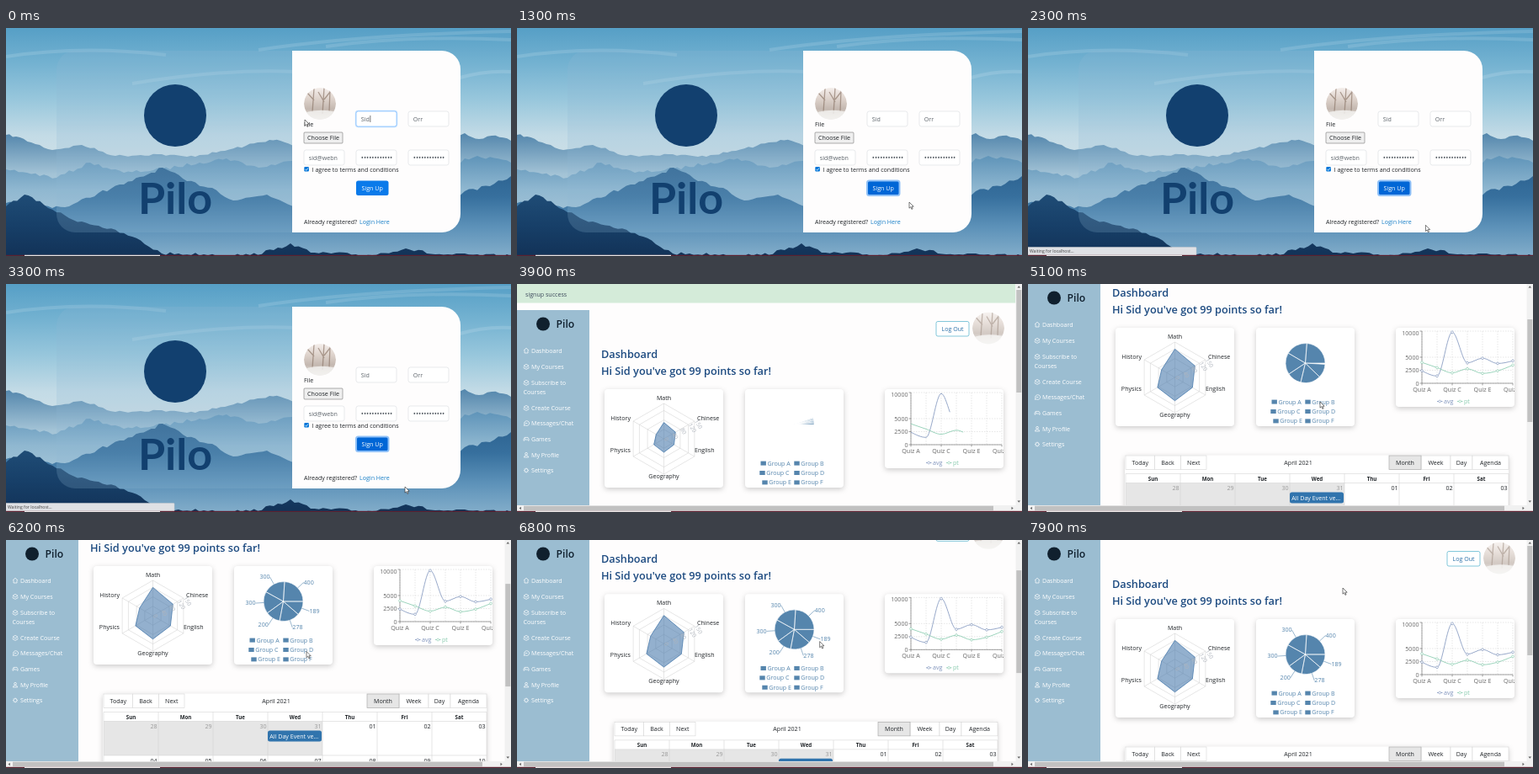
An HTML page for the animation above (8000 ms loop, 600 by 271 pixels).

```html
<!DOCTYPE html>
<html lang="en">
<head>
<meta charset="utf-8">
<title>Sign up and dashboard</title>
<style>
html, body { margin: 0; width: 100%; height: 100%; overflow: hidden; background: #fefdfd; }
svg { display: block; width: 600px; height: 271px; }
text { font: 7.1px "Open Sans", "Noto Sans", sans-serif; fill: #212529; white-space: pre; }
.m { text-anchor: middle; }
.e { text-anchor: end; }
.card { fill: #fff; filter: drop-shadow(0 2px 3px rgba(0,0,0,.2)); }
.field { fill: #fff; stroke: #d8dce0; stroke-width: .6; }
.val { fill: #5b6269; }
.w { fill: #fff; }
.icon { fill: none; stroke: #fff; stroke-width: .7; stroke-linejoin: round; }
.h { font-size: 12.7px; font-weight: 600; fill: #1c4a80; }
.steel { fill: #5585ad; }
.axis { fill: #666; }
.grid { fill: none; stroke: #ccc; stroke-width: .5; }
.line { fill: none; stroke-width: .8; }
.day { font-size: 6.2px; font-weight: 700; }
</style>
</head>
<body>
<svg id="stage" viewBox="0 0 600 271" xmlns="http://www.w3.org/2000/svg"></svg>
<script>
const LOOP = 8000, OPEN = 3400, DISMISS = 7400, ALERT = 31;
const $ = id => document.getElementById(id);
const text = (x, y, s, cls = '', more = '') => `<text x="${x}" y="${y}" class="${cls}" ${more}>${s}</text>`;
const rect = (x, y, w, h, fill, more = '') => `<rect x="${x}" y="${y}" width="${w}" height="${h}" fill="${fill}" ${more}/>`;
const path = (d, more = '') => `<path d="${d}" ${more}/>`;
const group = (id, s, more = '') => `<g id="${id}" ${more}>${s}</g>`;
const box = (x, y, w, h, cls, r = 2.5) => `<rect x="${x}" y="${y}" width="${w}" height="${h}" rx="${r}" class="${cls}"/>`;
const pt = p => p.map(v => v.toFixed(2)).join(' ');
const polar = (cx, cy, r, deg) => [cx + r * Math.cos(deg * Math.PI / 180), cy - r * Math.sin(deg * Math.PI / 180)];
const gradient = (id, ...stops) => `<linearGradient id="${id}" x2="0" y2="1">${
  stops.map((c, i) => `<stop offset="${i / (stops.length - 1)}" stop-color="${c}"/>`).join('')}</linearGradient>`;

let seed = 7;
const rnd = () => (seed = seed * 16807 % 2147483647) / 2147483647;

// Mountain outline: rough line through a few peaks, closed at the bottom.
function ridge(pts, fill, rough) {
  let d = 'M0 271';
  pts.forEach(([x, y], i) => {
    d += `L${x} ${y}`;
    const next = pts[i + 1];
    if (!next) return;
    const n = Math.ceil((next[0] - x) / 5);
    for (let k = 1; k < n; k++)
      d += 'L' + pt([x + (next[0] - x) * k / n, y + (next[1] - y) * k / n + (rnd() - .5) * rough]);
  });
  return path(d + 'L600 271Z', `fill="url(#${fill})"`);
}

const defs = `<defs>
  ${gradient('sky', '#569fc6', '#74b2d1', '#98c7dc', '#c3dbe6', '#d3e2e8')}
  ${gradient('far', '#5386ac', '#a3c3d6', '#c3d8e3', '#c3d8e3')}
  ${gradient('mid', '#5f94b9', '#8fb7d0', '#a9c8da', '#a9c8da')}
  ${gradient('hill', '#2b608e', '#37709e', '#5c91b8', '#82adca')}
  ${gradient('near', '#1f4c76', '#173f68', '#123257')}
  ${gradient('photo', '#f4eeeb', '#dfd4cd', '#c4b8b0', '#f2efee')}
  <clipPath id="disc"><circle r="19"/></clipPath>
  <clipPath id="view"><rect width="592.5" height="263"/></clipPath>
  <clipPath id="chart"><rect x="437" y="94" width="141" height="94"/></clipPath>
</defs>`;

const avatar = (x, y, o) => `<g transform="translate(${x} ${y})" clip-path="url(#disc)" opacity="${o}">
  <circle r="19" fill="url(#photo)"/>
  ${path('M-9 10L-7-18M3 12L5-19M11 9L12-16M-7-4L-15-13M5-2L-2-14M5-5L12-14', 'fill="none" stroke="#8b7668" stroke-width="1.3" opacity=".65"')}
  ${path('M-20 11Q0 5 20 10V20H-20Z', 'fill="#f3f1ef" opacity=".85"')}</g>`;

function signupPage() {
  const scene = rect(0, 0, 600, 170, 'url(#sky)') +
    path('M300 26Q420 8 600 4M380 22Q480 8 600 14M0 34Q90 20 190 32M150 66Q260 48 345 52M535 60Q570 50 600 52', 'fill="none" stroke="#fff" stroke-width="4" opacity=".13"') +
    ridge([[0,127],[12,129],[30,136],[55,145],[90,139],[130,152],[180,150],[215,153],[250,148],[285,140],[313,133],[326,134],[345,142],[520,130],[545,125],[562,132],[577,128],[600,134]], 'far', 3) +
    ridge([[0,168],[25,172],[60,178],[100,160],[140,172],[185,168],[230,160],[262,155],[300,166],[340,158],[520,165],[560,152],[600,160]], 'mid', 4) +
    ridge([[0,208],[40,212],[75,212],[110,196],[150,182],[186,166],[215,182],[245,190],[270,205],[310,198],[345,212],[500,222],[545,194],[575,188],[600,176]], 'hill', 4) +
    ridge([[0,212],[22,198],[45,210],[75,226],[110,235],[150,248],[185,268],[290,270],[318,264],[338,256],[362,267],[435,270],[475,262],[510,269],[600,271]], 'near', 4);
  const field = (x, y, s, size = 7.1) => box(x, y, 48, 18, 'field') +
    text(x + 5.8, y + 11.6, s, 'val', `style="font-size:${size}px"`);
  const dots = '•'.repeat(12);
  return scene +
    path('M82 27H340V243H82A22 22 0 0 1 60 221V49A22 22 0 0 1 82 27Z', 'fill="#8fb6d2" opacity=".22"') +
    path('M340 27H518A22 22 0 0 1 540 49V221A22 22 0 0 1 518 243H340Z', 'fill="#fefdfd"') +
    '<circle cx="201" cy="104" r="37" fill="#12406f"/>' +
    text(201, 221, 'Pilo', 'm', 'style="font:700 52px Lato,sans-serif;fill:#12406f"') +
    avatar(373, 90, 1) + text(354, 117, 'File') +
    rect(354, 124, 46, 13, '#efefef', 'stroke="#767676" stroke-width=".6" rx="1"') + text(377, 133.3, 'Choose File', 'm') +
    box(416, 99, 48, 18, 'field') +
    group('focus', rect(416, 99, 48, 18, '#fff', 'rx="2.5" stroke="#bfdeff" stroke-width="2.4"') +
      rect(416, 99, 48, 18, '#fff', 'rx="2.5" stroke="#80bdff" stroke-width=".7"')) +
    text(421.8, 110.6, 'Sid', 'val') + rect(432.6, 104, .6, 8, '#222', 'id="caret"') +
    field(478, 99, 'Orr') + field(354, 145, 'sid@webn') + field(416, 145, dots, 8.3) + field(478, 145, dots, 8.3) +
    rect(354.3, 165, 5.6, 5.6, '#0075d8', 'rx="1"') + path('M355.4 167.9l1.3 1.4 2.2-2.9', 'fill="none" stroke="#fff" stroke-width=".8"') +
    text(363.6, 171, 'I agree to terms and conditions') +
    rect(416, 181.5, 38.5, 17.5, '#0a7aea', 'id="submit" rx="2.5" stroke="#8fc0f7" stroke-width="0"') + text(435.2, 193, 'Sign Up', 'm w') +
    text(354, 233, 'Already registered?') + text(420, 233, 'Login Here', '', 'style="fill:#1a80c8"') +
    group('status', rect(-1, 260.5, 201, 10, '#dfe1e5', 'rx="1" stroke="#c4c7cb" stroke-width=".5"') +
      text(2, 267.3, 'Waiting for localhost...', '', 'style="font-size:5.1px;fill:#444"'));
}

const icons = {
  home: 'M8 0L11 -2.8 14 0M9 -.5V3H13V-.5',
  cap: 'M8 -.8L11 -2.6 14 -.8 11 1ZM8 .6V1.8L11 3.4 14 1.8V.6',
  chat: 'M8.3 2.8L8.8 1A3 2.8 0 1 1 10 2.4ZM9.8 0H12.4',
  game: 'M9 -1.6H13Q14.5 0 14 2.4L12.4 1H9.6L8 2.4Q7.5 0 9 -1.6ZM9.6 -.7V.7',
  user: 'M9.6 -1.2A1.4 1.4 0 1 0 12.4 -1.2A1.4 1.4 0 1 0 9.6 -1.2M8.3 3Q8.6 .7 11 .7T13.7 3Z',
  gear: 'M9 0A2 2 0 1 0 13 0A2 2 0 1 0 9 0M11 -3V-2M11 2V3M8 0H9M13 0H14M9 -2L9.6 -1.4M13 2L12.4 1.4M13 -2L12.4 -1.4M9 2L9.6 1.4'
};
function sidebar() {
  const items = [['home', 48, 'Dashboard'], ['cap', 67, 'My Courses'], ['cap', 86, 'Subscribe to'], ['cap', 116, 'Create Course'],
    ['chat', 134.5, 'Messages/Chat'], ['game', 153, 'Games'], ['user', 172, 'My Profile'], ['gear', 190.5, 'Settings']];
  return rect(0, 0, 86, 271, '#9bbdd1') + '<circle cx="31" cy="16.5" r="8" fill="#10202e"/>' +
    text(46.5, 20.5, 'Pilo', '', 'style="font-size:12.2px;font-weight:600;fill:#10202e"') +
    items.map(([icon, y, s]) => path(icons[icon], `class="icon" transform="translate(0 ${y})"`) + text(17, y + 2.5, s, 'w')).join('') +
    text(7.5, 99.5, 'Courses', 'w');
}

// Radar chart
const RX = 174.5, RY = 153, RR = 42;
const marks = [120, 98, 86, 99, 85, 65];
const hexagon = f => 'M' + marks.map((v, i) => pt(polar(RX, RY, f(v), 90 - i * 60))).join('L') + 'Z';
function radar() {
  const rings = [40, 80, 120, 150];
  const labels = [['Math', 174.5, 106.5, 'm'], ['Chinese', 214, 130.5, ''], ['English', 211, 169, ''],
    ['Geography', 174.5, 199.5, 'm'], ['Physics', 135, 169, 'e'], ['History', 135, 130.5, 'e']];
  return box(104, 94, 141, 117, 'card', 4) +
    rings.map(v => path(hexagon(() => v / 150 * RR), 'class="grid"')).join('') +
    marks.map((v, i) => path(`M${RX} ${RY}L${pt(polar(RX, RY, RR, i * 60 + 30))}`, 'class="grid"')).join('') +
    path('', 'id="radar" fill="#4b7cae" fill-opacity=".6" stroke="#4779ab" stroke-width=".8"') +
    [0, ...rings].map(v => {
      const [x, y] = polar(RX, RY, v / 150 * RR, 30);
      return text(x, y, v, '', `transform="rotate(60 ${x} ${y})" style="fill:#aeb4bc;font-size:6.6px"`);
    }).join('') +
    labels.map(([s, x, y, c]) => text(x, y, s, c)).join('');
}

// Pie chart
const PX = 329.5, PY = 136, PR = 23.5;
const shares = [400, 300, 300, 200, 278, 189];
const total = shares.reduce((a, b) => a + b);
const slices = k => {
  let a = 0;
  return shares.map(v => { const s = a; a += v / total * 360 * k; return [s, a]; });
};
const wedge = ([a, b]) => `M${PX} ${PY}L${pt(polar(PX, PY, PR, a))}A${PR} ${PR} 0 0 0 ${pt(polar(PX, PY, PR, b))}Z`;
function pie() {
  const labels = slices(1).map(([a, b], i) => {
    const m = (a + b) / 2, p = polar(PX, PY, PR, m), q = polar(PX, PY, PR + 9.5, m);
    return path(`M${pt(p)}L${pt(q)}`, 'stroke="#5585ad" stroke-width=".6"') +
      text(q[0], q[1] + 2.2, shares[i], q[0] > PX ? 'steel' : 'e steel');
  }).join('');
  const legend = [289.5, 329.3, 288.3, 329.3, 291.3, 329.3].map((x, i) => {
    const y = 182 + (i >> 1) * 11.4;
    return rect(x, y - 2.4, 6.4, 5, '#5585ad') + text(x + 8, y + 2.5, 'Group ' + 'ABCDEF'[i], 'steel');
  }).join('');
  return box(271, 94, 117, 117, 'card', 4) + path('', 'id="pie" fill="#5585ad" stroke="#fff" stroke-width=".6"') +
    group('shares', labels) + legend;
}

// Line chart
const chartX = i => 468 + 18 * i, chartY = v => 160 - v * .0062;
const series = { avg: [2400, 1398, 9800, 3908, 4800, 3800, 4300], pt: [4000, 3000, 2000, 2780, 1890, 2390, 3490] };
const tint = { avg: '#7d92bb', pt: '#85c9ac' };
function monotone(vals) {
  const y = vals.map(chartY), s = y.slice(1).map((v, i) => v - y[i]), n = s.length;
  const m = y.map((_, i) => {
    if (!i || i === n) return 0;
    const a = s[i - 1], b = s[i];
    return (Math.sign(a) + Math.sign(b)) * Math.min(Math.abs(a), Math.abs(b), Math.abs(a + b) / 4);
  });
  m[0] = (3 * s[0] - m[1]) / 2;
  m[n] = (3 * s[n - 1] - m[n - 1]) / 2;
  return y.reduce((d, v, i) => i ? d + `C${pt([chartX(i - 1) + 6, y[i - 1] + m[i - 1] / 3])} ${pt([chartX(i) - 6, v - m[i] / 3])} ${pt([chartX(i), v])}` : `M${pt([468, v])}`, '');
}
const dot = (x, y, c) => `<circle cx="${x}" cy="${y}" r="1.4" fill="#fff" stroke="${c}" stroke-width=".6"/>`;
function lines() {
  let grid = '';
  for (let i = 0; i < 7; i++) grid += `M${chartX(i)} 98V160`;
  const ticks = [10000, 5000, 2500, 0];
  ticks.forEach(v => grid += `M468 ${chartY(v)}H576`);
  const names = Object.keys(series);
  return box(437, 94, 141, 94, 'card', 4) + '<g clip-path="url(#chart)">' +
    path(grid, 'class="grid" stroke-dasharray="1.5 1.5"') +
    path('M468 98V160H576' + [0, 2, 4, 6].map(i => `M${chartX(i)} 160v2.5`).join('') + ticks.map(v => `M468 ${chartY(v)}h-2.5`).join(''), 'fill="none" stroke="#666" stroke-width=".6"') +
    ticks.map(v => text(464.5, Math.max(chartY(v), 100.5) + 2.5, v, 'e axis')).join('') +
    [0, 2, 4, 6].map(i => text(chartX(i), 170, 'Quiz ' + 'ABCDEFG'[i], 'm axis')).join('') +
    names.map(k => path(monotone(series[k]), `id="${k}" class="line" stroke="${tint[k]}" pathLength="1"`)).join('') +
    group('dots', names.map(k => series[k].map((v, i) => dot(chartX(i), chartY(v), tint[k])).join('')).join('')) +
    [['avg', 486], ['pt', 510]].map(([k, x]) => path(`M${x} 181.5h6.5`, `stroke="${tint[k]}" stroke-width=".8"`) +
      dot(x + 3.2, 181.5, tint[k]) + text(x + 8, 183.7, k, '', `style="fill:${tint[k]}"`)).join('') + '</g>';
}

function calendar() {
  const edge = 'stroke="#d5d5d5" stroke-width=".6"';
  const button = (x, x2, s, fill = '#fff') => rect(x, 246, x2 - x, 16.5, fill, edge) + text((x + x2) / 2, 257, s, 'm');
  let grid = '';
  for (let i = 0; i < 8; i++) grid += `M${116 + 65 * i} 267.5V401`;
  for (const y of [267.5, 278.5, 319, 360]) grid += `M116 ${y}H571`;
  let cells = '';
  for (let i = 0; i < 14; i++) {
    const n = i < 4 ? 28 + i : i - 3;
    cells += text(179.5 + i % 7 * 65, i < 7 ? 287 : 327.5, String(n).padStart(2, '0'), 'e', i < 4 ? 'style="fill:#999"' : '');
  }
  return box(115, 245.5, 456, 160, 'card', 3) +
    button(116, 150.5, 'Today') + button(150.5, 181.5, 'Back') + button(181.5, 212, 'Next') + text(321, 257, 'April 2021', 'm') +
    button(467, 502, 'Week') + button(502, 528, 'Day') + button(528, 571, 'Agenda') +
    rect(429, 246, 38, 16.5, '#e6e6e6', 'stroke="#adadad" stroke-width=".7"') + text(448, 257, 'Month', 'm') +
    rect(116, 278.5, 260, 40.5, '#e6e6e6') + path(grid, `fill="none" ${edge}`) +
    ['Sun', 'Mon', 'Tue', 'Wed', 'Thu', 'Fri', 'Sat'].map((d, i) => text(148.5 + 65 * i, 275.5, d, 'm day')).join('') + cells +
    rect(311, 289.5, 64, 13, '#3174ad', 'rx="2.5"') + text(313.3, 298.7, 'All Day Event ve...', 'w');
}

function dashboardPage() {
  const main = text(100, 57, 'Dashboard', 'h') + text(100, 77, "Hi Sid you've got 99 points so far!", 'h') +
    rect(498, 13.5, 39, 17.5, '#fff', 'rx="2" stroke="#4fb0cc" stroke-width=".7"') + text(517.5, 24.8, 'Log Out', 'm', 'style="fill:#2a6fa8"') +
    avatar(560, 21.5, .75) + radar() + pie() + lines() + calendar();
  return rect(0, 0, 600, 271, '#fefdfd') + '<g clip-path="url(#view)">' + group('main', main) + group('side', sidebar()) +
    group('alert', rect(0, 0, 592.5, 22.5, '#d4ebd9') + text(10, 14.5, 'signup success', '', 'style="fill:#3d4a5c"')) + '</g>' +
    rect(592.5, 0, 7.5, 271, '#f1f1f1') + rect(0, 263, 600, 7, '#f1f1f1') +
    rect(593.3, 7, 6, 125, '#c1c1c1', 'id="thumb"') + rect(8, 263.7, 558, 5.6, '#c1c1c1') +
    path('M594.5 4.5l1.8-2.2 1.8 2.2ZM594.5 257.5l1.8 2.2 1.8-2.2ZM4.8 264.7l-2.2 1.8 2.2 1.8ZM587.5 264.7l2.2 1.8-2.2 1.8Z', 'fill="#606060"');
}

$('stage').innerHTML = defs + group('signup', signupPage()) + group('dashboard', dashboardPage()) +
  rect(0, 269.8, 600, 1.2, '#5b2130') + rect(22, 269.8, 161, 1.2, '#e9e4e4') +
  path('M0 0V7.2L1.7 5.7 2.9 8.4 4.1 7.9 2.9 5.2H5.2Z', 'id="cursor" fill="#fff" stroke="#222" stroke-width=".6"');

const clamp = v => Math.min(1, Math.max(0, v));
// Smooth interpolation through [time, value, ...] keys.
function track(keys, t) {
  const i = keys.findIndex(k => k[0] > t);
  if (i === 0) return keys[0].slice(1);
  if (i < 0) return keys[keys.length - 1].slice(1);
  const a = keys[i - 1], b = keys[i], u = (t - a[0]) / (b[0] - a[0]), e = u * u * (3 - 2 * u);
  return a.slice(1).map((v, j) => v + (b[j + 1] - v) * e);
}
// CSS "ease" curve
function ease(x) {
  if (x <= 0 || x >= 1) return clamp(x);
  const bez = (a, b, s) => 3 * a * s * (1 - s) ** 2 + 3 * b * s * s * (1 - s) + s ** 3;
  let lo = 0, hi = 1;
  for (let i = 0; i < 24; i++) {
    const s = (lo + hi) / 2;
    if (bez(.25, .25, s) < x) lo = s; else hi = s;
  }
  return bez(.1, 1, lo);
}
const scrollKeys = [[4600, 0], [5000, 73], [5700, 73], [6000, 94], [6600, 94], [7100, 0]];
const cursorKeys = [[100, 355, 109], [750, 438, 191], [1000, 438, 191], [1300, 466, 207], [1800, 466, 207], [2500, 474, 241],
  [3400, 474, 241], [4300, 440, 200], [4900, 347, 140], [5500, 347, 140], [6100, 357, 132.5], [6600, 357, 132.5], [7400, 374, 57]];

const show = (id, on) => $(id).setAttribute('display', on ? 'inline' : 'none');
const move = (id, x, y) => $(id).setAttribute('transform', `translate(${x} ${y})`);

function draw(t) {
  const open = t >= OPEN, clicked = t >= 850;
  show('signup', !open);
  show('dashboard', open);
  show('cursor', !open || t >= 4300);
  move('cursor', ...track(cursorKeys, t));
  if (!open) {
    show('focus', !clicked);
    show('caret', !clicked && t % 1060 < 530);
    show('status', t >= 1600);
    $('submit').setAttribute('fill', clicked ? '#0066d6' : '#0a7aea');
    $('submit').setAttribute('stroke-width', clicked ? 2 : 0);
    return;
  }
  const [scroll] = track(scrollKeys, t), top = t < DISMISS ? ALERT : 0;
  show('alert', top > 0);
  move('alert', 0, -scroll);
  move('main', 0, top - scroll);
  move('side', 0, Math.max(0, top - scroll));
  $('thumb').setAttribute('y', 7 + scroll * .48);
  $('thumb').setAttribute('height', top ? 122 : 130);

  const age = t - OPEN, k = ease(age / 1500), turn = ease((age - 400) / 1500);
  $('radar').setAttribute('d', hexagon(v => v / 150 * RR * k));
  $('pie').setAttribute('d', turn ? slices(turn).map(wedge).join('') : '');
  show('shares', turn === 1);
  for (const id in series) $(id).setAttribute('stroke-dasharray', k < 1 ? `${k} 2` : 'none');
  show('dots', k === 1);
}

const start = performance.now();
(function frame() {
  draw((performance.now() - start) % LOOP);
  requestAnimationFrame(frame);
})();
</script>
</body>
</html>
```
